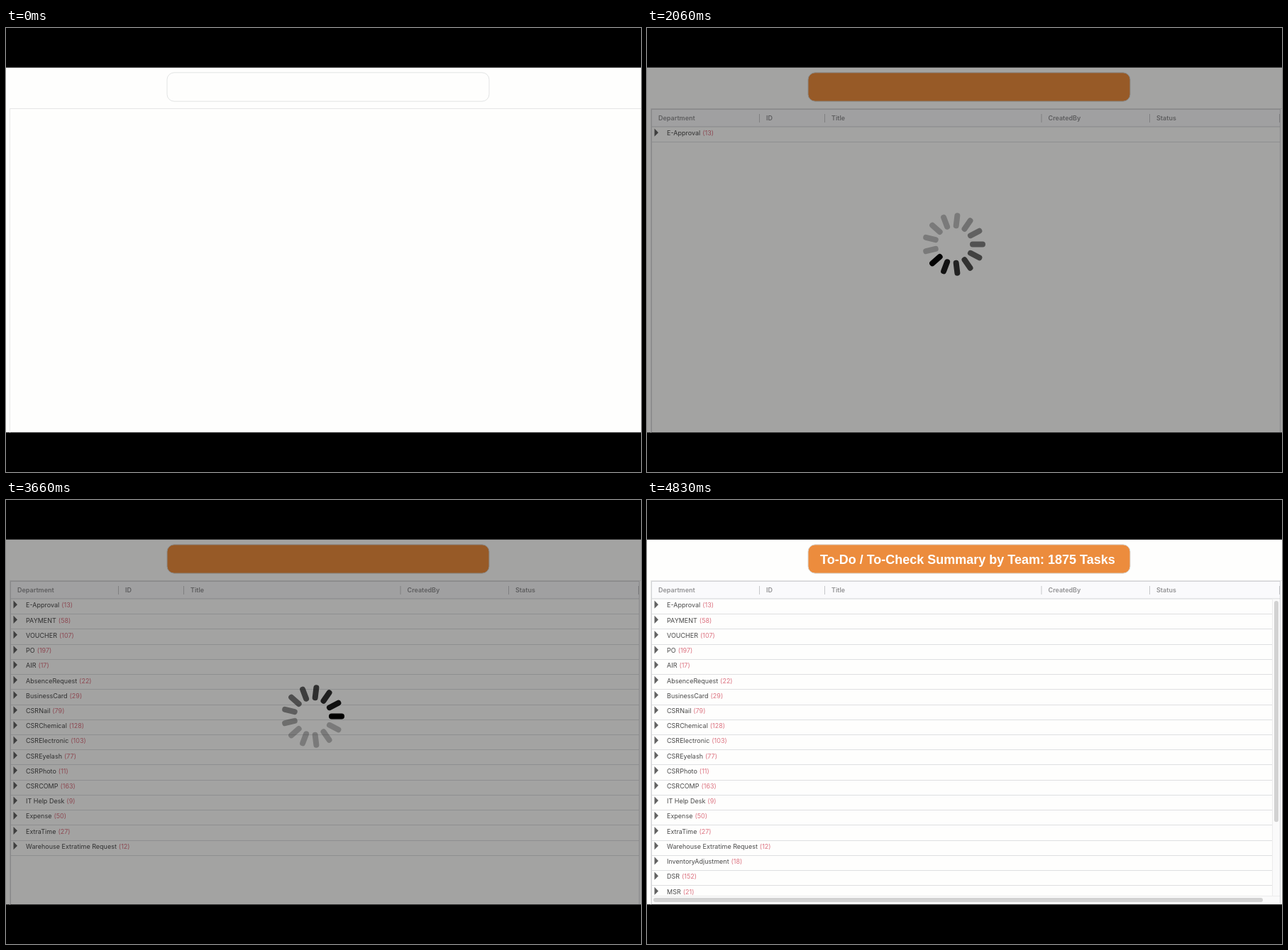
Write an HTML page with a canvas that moves like this. It is 895 px wide and 625 px high and loops after 5.5 s.

```html
<!DOCTYPE html>
<html lang="en">
<head>
<meta charset="utf-8">
<title>Task summary loading</title>
<style>
html, body { margin: 0; width: 100%; height: 100%; overflow: hidden; background: #000; }
canvas { display: block; }
</style>
</head>
<body>
<canvas id="stage" width="895" height="625"></canvas>
<script>
const ctx = document.getElementById('stage').getContext('2d');
const LOOP = 5500, LOAD_START = 660, LOAD_END = 4830;
const ROW_H = 21.22, ROWS_TOP = 139, PAGE_TOP = 55.5, PAGE_BOTTOM = 569.5;
const UI = 'Inter, sans-serif';
const WHITE = '#fefefd';

const columns = [['Department', 16], ['ID', 168], ['Title', 260], ['CreatedBy', 565.5], ['Status', 718]];
const rows = [
  ['E-Approval', 13], ['PAYMENT', 58], ['VOUCHER', 107], ['PO', 197], ['AIR', 17],
  ['AbsenceRequest', 22], ['BusinessCard', 29], ['CSRNail', 79], ['CSRChemical', 128],
  ['CSRElectronic', 103], ['CSREyelash', 77], ['CSRPhoto', 11], ['CSRCOMP', 163],
  ['IT Help Desk', 9], ['Expense', 50], ['ExtraTime', 27], ['Warehouse Extratime Request', 12],
  ['InventoryAdjustment', 18], ['DSR', 152], ['MSR', 21]
];
// When each row arrives; the last six lie below the visible area.
const arrivals = [
  910, 2100, 2140, 2180, 2220, 2260, 2380, 2480, 2580, 2680, 2770, 2860, 3000,
  3200, 3400, 3560, 3640, 3760, 3920, 4060, 4180, 4300, 4420, 4540, 4660, 4830
];

function rect(x, y, w, h, color) {
  ctx.fillStyle = color;
  ctx.fillRect(x, y, w, h);
}

function pill(x, y, w, h, r, fill, stroke) {
  ctx.beginPath();
  ctx.roundRect(x, y, w, h, r);
  ctx.fillStyle = fill;
  ctx.fill();
  if (stroke) {
    ctx.strokeStyle = stroke;
    ctx.lineWidth = 1;
    ctx.stroke();
  }
}

function text(str, x, y, color, font = '9px ' + UI) {
  ctx.font = font;
  ctx.fillStyle = color;
  ctx.fillText(str, x, y);
  return ctx.measureText(str).width;
}

function drawHeader() {
  rect(6, 114, 887, 25, '#fafafc');
  rect(6, 114, 887, 1, '#d2d3d6');
  rect(6, 114, 1, 455, '#d2d3d6');
  rect(892, 114, 1, 455, '#d2d3d6');
  rect(6, 138.5, 887, 1, '#d2d3d6');
  columns.forEach(([label, x], i) => {
    text(label, x, 130.3, '#929294', '600 9px ' + UI);
    if (i) rect(x - 10, 121, 1, 12, '#c6c7ca');
  });
  rect(891, 121, 1, 12, '#c6c7ca');
}

function drawRow(i, right, bottom) {
  const [name, count] = rows[i];
  const y = ROWS_TOP + i * ROW_H;
  ctx.beginPath();
  ctx.moveTo(10.5, y + 2.6);
  ctx.lineTo(16, y + 8.2);
  ctx.lineTo(10.5, y + 13.8);
  ctx.fillStyle = '#626262';
  ctx.fill();
  const width = text(name, 28, y + 12.4, '#4a4a4a');
  text(`(${count})`, 28 + width + 3, y + 12.4, '#dc7380');
  const line = Math.round(y + ROW_H);
  if (line < bottom) rect(7, line, right - 7, 1, '#dedfe1');
}

function drawScrollbars(total) {
  rect(881, 139.5, 11, 418, '#fafafa');
  rect(881, 139.5, 1, 418, '#ececec');
  rect(7, 557, 885, 11, '#fafafa');
  rect(7, 557, 885, 1, '#ececec');
  pill(884, 142, 6, 415 * 19.5 / total, 3, '#d2d2d2');
  pill(9, 560, 859, 6, 3, '#d2d2d2');
}

function drawLoadingBox() {
  rect(6, 114, 887, 455, 'rgba(255,255,255,.66)');
  pill(416.5, 323.5, 66.5, 36, 1, WHITE, '#d6d7d9');
  text('Loading...', 429, 344.8, '#575757');
}

function drawSpinner(t) {
  const bars = 13;
  const tick = 20 + Math.floor((t - 20) / 40) * 40;
  const head = 12.995 + (tick - LOAD_START) * 0.013004;
  ctx.lineWidth = 8;
  ctx.lineCap = 'round';
  for (let i = 0; i < bars; i++) {
    const age = ((head - i + bars) % bars) / bars;
    const angle = i * 2 * Math.PI / bars;
    const c = Math.cos(angle), s = Math.sin(angle);
    ctx.strokeStyle = `rgba(0,0,0,${Math.max(0.25, 1 - 0.75 * age / 0.6)})`;
    ctx.beginPath();
    ctx.moveTo(432.5 + 26.5 * c, 304.5 + 26.5 * s);
    ctx.lineTo(432.5 + 40.5 * c, 304.5 + 40.5 * s);
    ctx.stroke();
  }
}

function draw(t) {
  const started = t >= LOAD_START, done = t >= LOAD_END;
  const total = arrivals.filter(at => t >= at).length;
  const overflow = total > rows.length;

  rect(0, 0, 895, 625, '#000');
  ctx.save();
  ctx.beginPath();
  ctx.rect(0, PAGE_TOP, 895, PAGE_BOTTOM - PAGE_TOP);
  ctx.clip();
  rect(0, PAGE_TOP, 895, 514, WHITE);
  rect(5, 113, 890, 1, '#e6e6e6');
  rect(5, 113, 1, 457, '#e9e9e9');
  pill(227, 62.8, 454, 40.4, 10, started ? '#ec8c3d' : WHITE, started ? '#d9dcdc' : '#e2e4e4');

  if (started) {
    drawHeader();
    for (let i = 0; i < Math.min(total, rows.length); i++) {
      drawRow(i, overflow ? 881 : 892, overflow ? 557 : 569);
    }
    if (overflow) drawScrollbars(total);
    if (!total) drawLoadingBox();
    if (done) {
      text('To-Do / To-Check Summary by Team: 1875 Tasks', 244, 89.5, '#fff',
        'bold 18px "Liberation Sans", Arial, sans-serif');
    } else {
      rect(0, PAGE_TOP, 895, 514, 'rgba(0,0,0,.36)');
      drawSpinner(t);
    }
  }
  ctx.restore();
}

const start = performance.now();
function frame() {
  draw((performance.now() - start) % LOOP);
  requestAnimationFrame(frame);
}
frame();
</script>
</body>
</html>
```
